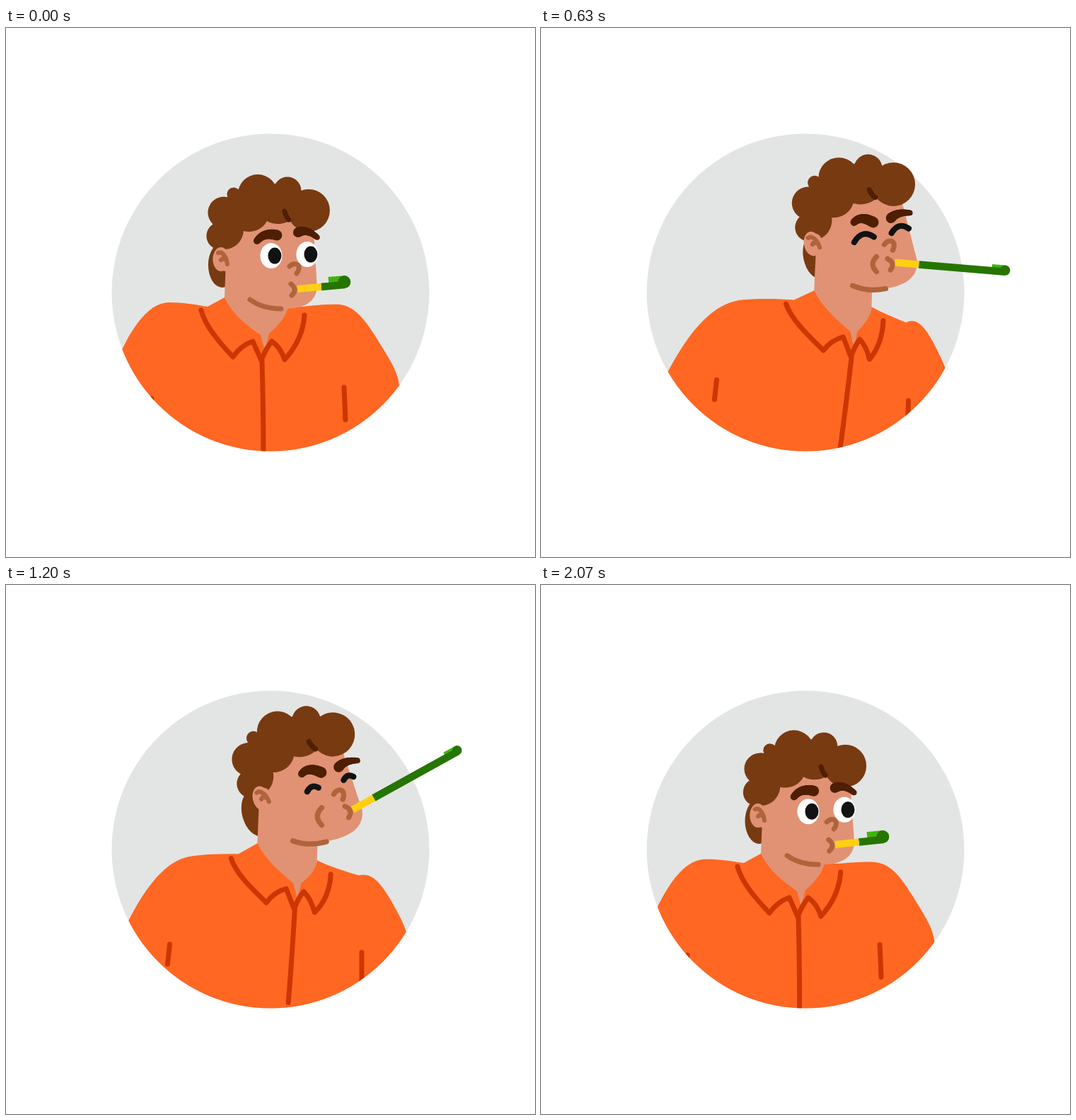
Write an HTML page with a canvas that moves like this. It is 748 px wide and 748 px high and loops after 2.1 s.

```html
<!DOCTYPE html>
<html lang="en">
<head>
<meta charset="utf-8">
<title>Party blower</title>
<style>
html, body { margin: 0; width: 100%; height: 100%; overflow: hidden; background: #fff; }
canvas { display: block; }
</style>
</head>
<body>
<canvas id="stage" width="748" height="748"></canvas>
<script>
const ctx = document.getElementById('stage').getContext('2d');
const LOOP = 2100, TAU = 2 * Math.PI;
const SKIN = '#e19274', HAIR = '#783a11', DARK = '#4f1f02', LINE = '#b0643c', SHIRT = '#ff6722',
  SEAM = '#cc3601', GREEN = '#267500', LIME = '#40b40d', YELLOW = '#ffd012', INK = '#121212';

// Key poses: head position, tilt and turn; body lean and collar lift; blower aim and reach.
const poses = [
  { x: 306, y: 262, tilt: 0, turn: 0, lean: 0, lift: 0, aim: -5, reach: 67 },
  { x: 346.5, y: 258, tilt: -1, turn: -.8, lean: .32, lift: 0, aim: 25, reach: 70 },
  { x: 376, y: 249, tilt: -11, turn: -.2, lean: .83, lift: 0, aim: 5, reach: 156 },
  { x: 377, y: 248, tilt: -20, turn: .8, lean: 1, lift: 0, aim: -21, reach: 200 },
  { x: 341, y: 248, tilt: -15, turn: 1.2, lean: .5, lift: .75, aim: -29, reach: 170 },
  { x: 335, y: 246, tilt: -8.5, turn: .6, lean: .32, lift: 1, aim: -18, reach: 88 }
];
// Time in ms -> position along the poses; the end meets the first pose again.
const timing = [[0, 0], [150, -.25], [390, 1], [630, 2], [870, 3], [1090, 3], [1200, 4],
  [1600, 4.95], [1860, 5], [2070, 5.93], [LOOP, 6]];

const clamp = v => Math.max(0, Math.min(1, v));
const ramp = (v, from, to) => clamp((v - from) / (to - from));
const lerp = (a, b, s) => a + (b - a) * s;
const bump = (x, center, width) => Math.exp(-(((x - center) / width) ** 2));

// Monotone cubic through the timing points.
function phaseAt(t) {
  const secant = i => (timing[i + 1][1] - timing[i][1]) / (timing[i + 1][0] - timing[i][0]);
  const slope = i => {
    if (i === 0) return secant(0);
    if (i === timing.length - 1) return secant(i - 1);
    const a = secant(i - 1), b = secant(i);
    return a * b > 0 ? 2 * a * b / (a + b) : 0;
  };
  let i = 0;
  while (t >= timing[i + 1][0]) i++;
  const [t0, a] = timing[i], [t1, b] = timing[i + 1], h = t1 - t0, s = (t - t0) / h;
  return lerp(a, b, s * s * (3 - 2 * s)) + h * s * (1 - s) * (slope(i) * (1 - s) - slope(i + 1) * s);
}

function poseAt(phase) {
  const i = Math.max(0, Math.floor(phase)), from = poses[i % 6], to = poses[(i + 1) % 6], pose = {};
  for (const key in from) pose[key] = lerp(from[key], to[key], phase - i);
  return pose;
}

// Bends the upright body: the middle leans most, the far shoulder drops, the collar lifts.
function bend(path, { lean, lift }) {
  const drop = lean * lean + .4 * lift;
  return path.replace(/(\d+) (\d+)/g, (_, px, py) => {
    const x = +px, y = +py;
    const dx = lean * (15 + 80 * bump(x, 335, 160)) * (1 - .0018 * Math.max(0, y - 470));
    const dy = 38 * drop * bump(x, 465, 40) - 12 * lean * bump(x, 300, 70) - 14 * lift * bump(x, 330, 85);
    return `${(x + dx).toFixed(2)} ${(y + dy).toFixed(2)}`;
  });
}

function fill(d, color) {
  ctx.fillStyle = color;
  ctx.fill(new Path2D(d));
}

function stroke(d, color, width = 7, cap = 'round') {
  ctx.strokeStyle = color;
  ctx.lineWidth = width;
  ctx.lineCap = cap;
  ctx.lineJoin = 'round';
  ctx.stroke(new Path2D(d));
}

function oval(x, y, rx, ry, color) {
  ctx.fillStyle = color;
  ctx.beginPath();
  ctx.ellipse(x, y, rx, ry, 0, 0, TAU);
  ctx.fill();
}

function at(x, y, degrees, scale, draw) {
  ctx.save();
  ctx.translate(x, y);
  ctx.rotate(degrees * TAU / 360);
  ctx.scale(scale, scale);
  draw();
  ctx.restore();
}

// Tapered stroke that moves from a raised to a frowning curve.
function brow(raised, frown, closed, r0, r1) {
  const [x0, y0, cx, cy, x1, y1] = raised.map((v, i) => lerp(v, frown[i], closed));
  for (let s = 0; s <= 1.001; s += .04) {
    const q = 1 - s, r = lerp(r0, r1, s);
    oval(q * q * x0 + 2 * q * s * cx + s * s * x1, q * q * y0 + 2 * q * s * cy + s * s * y1, r, r, DARK);
  }
}

function eye(x, y, closed, size) {
  at(x, y, 0, 1, () => {
    if (closed < 1) {
      ctx.scale(1 - .4 * closed, 1 - closed);
      oval(0, 0, 15.5, 18, '#fff');
      oval(5, 0, 9.5, 11.5, INK);
    } else {
      stroke(`M${-14 * size} ${4 * size} Q0 ${-12 * size} ${14 * size} ${2 * size}`, INK, 8);
    }
  });
}

function blower(reach, curl) {
  const r = 6 + 3 * curl, width = 13 * curl, y = 5 - 2 * r + width / 2;
  stroke(`M${reach} ${y} L${reach - 17 - 5 * curl} ${y}`, LIME, width, 'butt');
  stroke(`M34 0 L${reach} 0`, GREEN, 10.5, 'butt');
  oval(reach, 5 - r, r, r, GREEN);
  stroke('M0 0 L34 0', YELLOW, 10, 'butt');
}

function body(pose) {
  fill(bend('M100 640 C120 560 150 480 170 443 C186 414 205 389 230 388 C250 388 268 391 285 394 L309 381 L397 394 C420 396 445 389 472 391 C496 394 511 418 525 440 C542 468 556 488 556 508 L560 640 Z', pose), SHIRT);
}

function collar(pose) {
  stroke(bend('M276 399 C282 422 303 446 321 465 Q332 449 349 443 L361 470 Q367 454 376 443 Q388 451 394 469 Q420 440 422 406 M362 470 Q364 540 364 602', pose), SEAM);
  at(206 + 51 * pose.lean, 524 - 32 * pose.lean, 0, 1, () => stroke('M0 0 L-3 28', SEAM));
  at(478 + 50 * pose.lean, 508 + 23 * pose.lean, 5 * pose.lean, 1, () => stroke('M0 0 L2 46', SEAM));
}

function hair() {
  fill('M96 9 C92 15 74 18 63 11 C56 24 42 28 30 25 C29 38 19 51 2 51 L-10 38 L0 -12 L24 -34 L50 -40 L77 -42 L92 -36 L113 -31 L122 -4 L131 24 C114 23 102 18 96 9 Z', HAIR);
  for (const [x, y, r] of [[-3, 32, 19.5], [2, -1, 22.5], [16, -27, 9.5], [50, -27, 28], [92, -32, 19.5], [122, -4, 30]])
    oval(x, y, r, r, HAIR);
  stroke('M88 -3 Q90 5 94 9', DARK);
}

// Features slide sideways with the turn, more so the further they stick out.
function head({ tilt, turn, aim, reach }, scale, closed, lid) {
  const curl = clamp(1 - (reach - 88) / 100) * .9 + .1;
  const puff = closed * (1.15 - .9 * curl);
  const side = 6 * turn;

  fill(`M${2 + 7 * turn} 54 L60 134 L92 135 Q130 134 134 106 L129 22 L114 -7 L24 -12 Z`, SKIN);
  hair();
  at(side - 2, 65 - 10 * closed, 0, 1, () => {
    oval(0, 0, 11.5, 17, SKIN);
    oval(6, 2, 9, 15, SKIN);
    stroke('M-4 -9 C2 -12 8 -3 9 7 M0 1 Q2 -2 5 0', LINE, 6);
  });
  at(-side, 0, 0, 1, () => stroke('M39 122 Q57 135 83 135', LINE));

  at(side, 0, 0, 1, () => {
    eye(69, 60, closed, lid);
    eye(120, 58, closed, lid * .87);
    brow([49, 39, 59, 26, 77, 31], [60, 37, 71, 29, 86, 42], closed, 5, 7.5);
    brow([107, 27, 119, 21, 134, 34], [111, 41, 121, 34, 138, 39], closed, 7, 3.8);
    at(101, 78, 0, 1, () => stroke('M-6 -3 C0 -9 9 -7 7 1 Q6 5 4 7', LINE));
  });

  if (puff > .1) at(75, 99, -tilt, 1, () => stroke(`M${4 * puff} ${-13 * puff} Q${-9 * puff} 0 ${4 * puff} ${13 * puff}`, LINE));
  at(99 + 13 * turn, 108 - 5 * closed, 0, 1, () => {
    at(7, -1, aim - tilt, 1 / scale, () => blower(reach, curl));
    stroke('M-2 -8 Q8 0 -1 8', LINE);
  });
}

function draw(t) {
  const phase = phaseAt(t), pose = poseAt(phase);
  const scale = 1 - .0025 * pose.tilt;
  const closed = ramp(phase, .1, .5) * (1 - ramp(phase, 4.2, 4.7));
  const lid = 1 - .42 * ramp(phase, 3, 4);
  const sway = Math.sin(Math.PI * ramp(t, 870, 1090));

  ctx.clearRect(0, 0, 748, 748);
  oval(374, 374, 224.5, 224.5, '#e3e5e4');

  const inCircle = paint => {
    ctx.save();
    ctx.beginPath();
    ctx.arc(374, 374, 224.5, 0, TAU);
    ctx.clip();
    ctx.translate(4 * sway, -5 * sway);
    paint();
    ctx.restore();
  };
  const inHead = paint => at(pose.x + 4 * sway, pose.y - 5 * sway, pose.tilt, scale, paint);

  inCircle(() => body(pose));
  inHead(() => oval(-5 * pose.turn, 73, 20, 32, HAIR));
  inCircle(() => {
    fill(bend('M312 305 L309 381 C320 405 340 420 360 434 L366 456 L372 432 C384 422 394 410 398 398 L400 340 Z', pose), SKIN);
    collar(pose);
  });
  inHead(() => head(pose, scale, closed, lid));
}

function tick() {
  draw(performance.now() % LOOP);
  requestAnimationFrame(tick);
}
tick();
</script>
</body>
</html>
```
